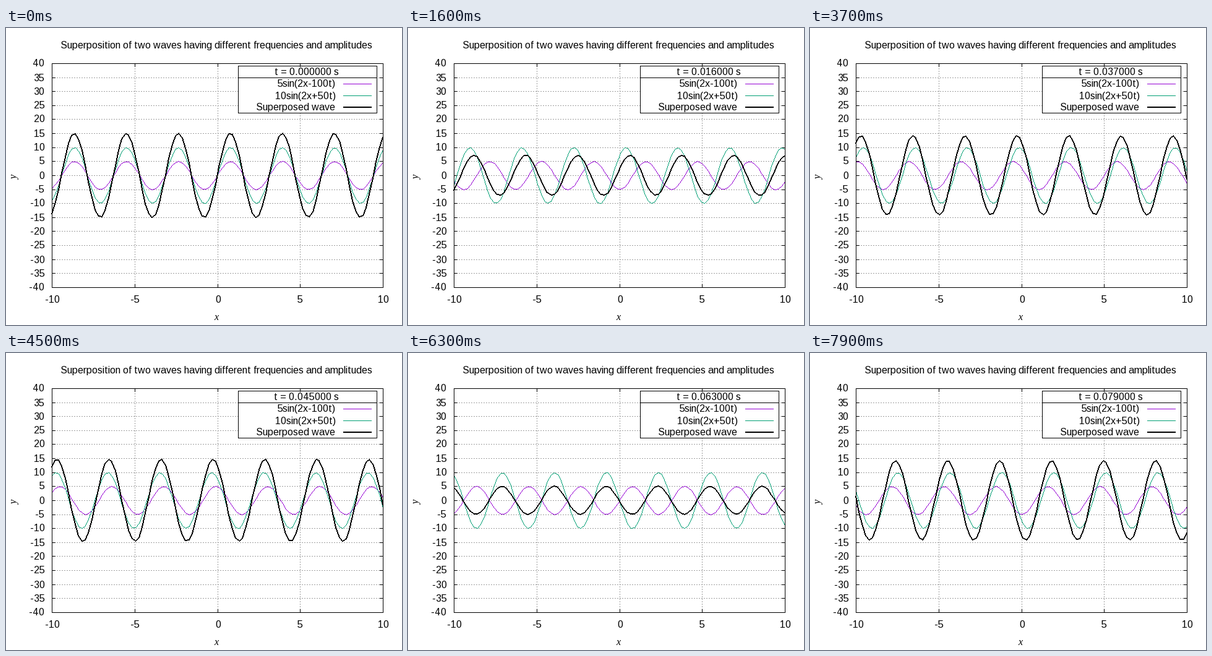
Animation, 640 px wide and 480 px high, one loop 8 s. Source, as a matplotlib script:

```python
import matplotlib.pyplot as plt
import numpy as np
from matplotlib.animation import FuncAnimation

W, H, DPI = 640, 480, 100
FRAMES, STEP_MS, DT = 80, 100, 0.001
LEFT, RIGHT, TOP, BOTTOM = 74, 609, 57, 419
KEY = (375, 61, 599, 137)
BLACK, GRAY, PURPLE, GREEN = (0, 0, 0), (160, 160, 160), (148, 0, 211), (0, 158, 115)

plt.rcParams["font.family"] = "Liberation Sans"
plt.rcParams["text.hinting_factor"] = 1


def to_px(x):
    return LEFT + np.floor((x + 10) / 20 * (RIGHT - LEFT) + 0.5).astype(int)


def to_py(y):
    return BOTTOM - np.floor((y + 40) / 80 * (BOTTOM - TOP) + 0.5).astype(int)


def segment(img, x0, y0, x1, y1, color, width=1):
    """Hard-edged line; its width is measured across the minor axis."""
    steep = abs(y1 - y0) > abs(x1 - x0)
    a, b = ((y0, x0), (y1, x1)) if steep else ((x0, y0), (x1, y1))
    (u0, v0), (u1, v1) = sorted([a, b])
    u = np.arange(u0, u1 + 1)
    slope = (v1 - v0) / max(u1 - u0, 1)
    v = v0 + (np.sign(slope) * np.floor(abs(slope) * (u - u0) + 0.5)).astype(int)
    for k in range(width):
        w = v - width // 2 + k
        if steep:
            img[u, w] = color
        else:
            img[w, u] = color


def polyline(img, xs, ys, color, width=1):
    for p in zip(xs[:-1], ys[:-1], xs[1:], ys[1:]):
        segment(img, *p, color, width)


def box(img, x0, y0, x1, y1):
    polyline(img, [x0, x1, x1, x0, x0], [y0, y0, y1, y1, y0], BLACK)


def dotted(pixels):
    pixels[np.arange(len(pixels)) % 4 < 2] = GRAY


fig = plt.figure(figsize=(W / DPI, H / DPI), dpi=DPI, facecolor="white")
ax = fig.add_axes([0, 0, 1, 1])
ax.axis("off")


def label(x, y, s, ha="center", va="baseline", **kw):
    return ax.text(x, y, s, ha=ha, va=va, fontsize=16 * 72 / DPI, **kw)


# Grid, ticks and tick labels
base = np.full((H, W, 3), 255, np.uint8)
for v in range(-35, 36, 5):
    dotted(base[to_py(v), LEFT:RIGHT + 1])
for v in (-5, 0, 5):
    dotted(base[TOP:BOTTOM + 1, to_px(v)])
x0, y0, x1, y1 = KEY
base[y0:y1 + 1, x0:x1 + 1] = 255
for v in range(-40, 41, 5):
    y = to_py(v)
    segment(base, LEFT, y, LEFT + 5, y, BLACK)
    segment(base, RIGHT - 5, y, RIGHT, y, BLACK)
    label(62, y + 5, str(v), "right")
for v in range(-10, 11, 5):
    x = to_px(v)
    segment(base, x, BOTTOM - 5, x, BOTTOM, BLACK)
    segment(base, x, TOP, x, TOP + 5, BLACK)
    label(x, 443, str(v))

# Titles
label(340, 33, "Superposition of two waves having different frequencies and amplitudes")
serif = dict(family="Liberation Serif", style="italic")
label(339, 471, "x", **serif)
label(22, 241, "y", "right", "center", rotation=90, **serif)

# Key
box(base, *KEY)
segment(base, x0, 80, x1, 80, BLACK)
clock = label(485, 75, "")
styles = [("5sin(2x-100t)", PURPLE, 1), ("10sin(2x+50t)", GREEN, 1),
          ("Superposed wave", BLACK, 2)]
for i, (name, color, width) in enumerate(styles):
    y = 90 + 19 * i
    label(532, y + 5, name, "right")
    segment(base, 545, y, 590, y, color, width)

plot = ax.imshow(base, interpolation="nearest", aspect="auto")
X = np.linspace(-10, 10, 100)


def draw(i):
    t = i * DT
    a = 5 * np.sin(2 * X - 100 * t)
    b = 10 * np.sin(2 * X + 50 * t)
    img = base.copy()
    for y, (_, color, width) in zip((a, b, a + b), styles):
        polyline(img, to_px(X), to_py(y), color, width)
    box(img, LEFT, TOP, RIGHT, BOTTOM)
    plot.set_data(img)
    clock.set_text(f"t = {t:.6f} s")
    return [plot, clock]


anim = FuncAnimation(fig, draw, frames=FRAMES, interval=STEP_MS,
                     init_func=lambda: draw(0), repeat=True, repeat_delay=0, blit=False)
plt.show()
```
